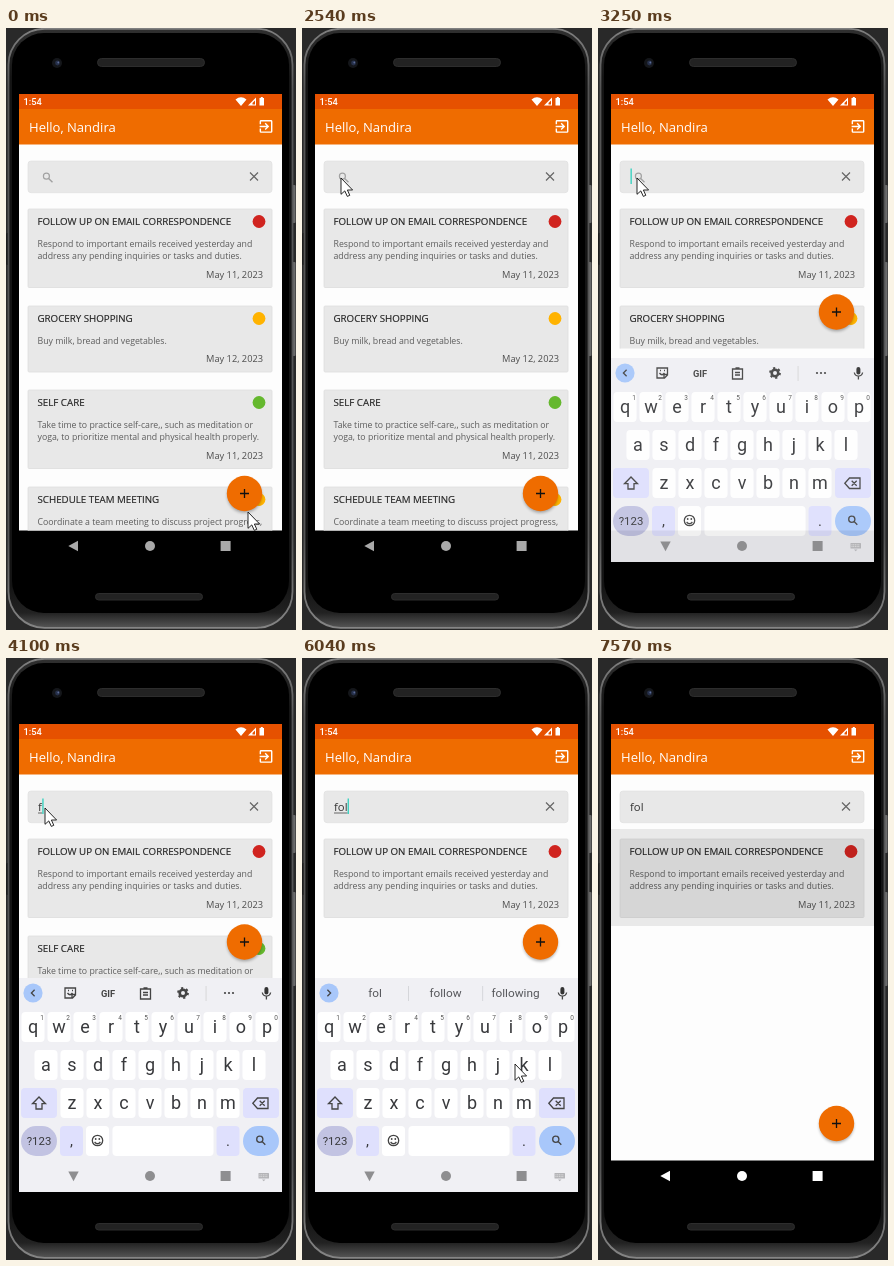
Write an HTML page that moves like this. It is 290 px wide and 602 px high and loops after 8290 ms.

```html
<!DOCTYPE html>
<html lang="en">
<head>
<meta charset="utf-8">
<title>Task search</title>
<style>
html, body { margin: 0; width: 100%; height: 100%; overflow: hidden; background: #292929; }
svg { display: block; width: 100vw; height: 100vh; }
text { font-family: "Open Sans", "Noto Sans", sans-serif; white-space: pre; }
.kb text, .status { font-family: Roboto, Arial, sans-serif; }
.mid { text-anchor: middle; }
.line { fill: none; stroke: #444; stroke-width: 1.3; }
</style>
</head>
<body>
<svg id="stage" viewBox="0 0 290 602" xmlns="http://www.w3.org/2000/svg"></svg>
<script>
const LOOP = 8290;
const stage = document.getElementById('stage');

const rect = (x, y, w, h, fill, r = 0, more = '') =>
  `<rect x="${x}" y="${y}" width="${w}" height="${h}" rx="${r}" fill="${fill}" ${more}/>`;
const dot = (x, y, r, fill, more = '') => `<circle cx="${x}" cy="${y}" r="${r}" fill="${fill}" ${more}/>`;
const label = (x, y, size, fill, str, more = '') =>
  `<text x="${x}" y="${y}" font-size="${size}" fill="${fill}" ${more}>${str}</text>`;
const path = (d, more = 'class="line"') => `<path d="${d}" ${more}/>`;
const group = (id, body, more = '') => `<g id="${id}" ${more}>${body}</g>`;
const shade = (id, ...stops) => `<linearGradient id="${id}" x2="0" y2="1">${stops.map(([at, color]) =>
  `<stop offset="${at}" stop-color="${color}"/>`).join('')}</linearGradient>`;

const tasks = [
  { title: 'FOLLOW UP ON EMAIL CORRESPONDENCE', color: '#d0241f', date: 'May 11, 2023',
    lines: ['Respond to important emails received yesterday and', 'address any pending inquiries or tasks and duties.'] },
  { title: 'GROCERY SHOPPING', color: '#ffb300', date: 'May 12, 2023',
    lines: ['Buy milk, bread and vegetables.'] },
  { title: 'SELF CARE', color: '#65b82e', date: 'May 11, 2023',
    lines: ['Take time to practice self-care,, such as meditation or', 'yoga, to prioritize mental and physical health properly.'] },
  { title: 'SCHEDULE TEAM MEETING', color: '#ffb300', date: 'May 12, 2023',
    lines: ['Coordinate a team meeting to discuss project progress,'] }
];

function card(task, i) {
  const h = 53.5 + 12.5 * task.lines.length;
  return group('card' + i,
    rect(22, 0, 244, h, '#e8e8e8', 1, 'stroke="#dedede" stroke-width=".8"') +
    label(31.5, 16, 9.74, '#222', task.title, 'stroke="#222" stroke-width=".15"') +
    task.lines.map((s, n) => label(31.5, 37.5 + 12.5 * n, 8.75, '#5c5c5c', s)).join('') +
    label(257, h - 9.8, 9.25, '#4c4c4c', task.date, 'text-anchor="end"') +
    dot(253, 12.5, 6.4, task.color));
}

function phone() {
  return rect(286, 157, 3.5, 38, '#6c6c6c', 1) + rect(286, 234, 3.5, 94, '#6c6c6c', 1) +
    rect(.5, 205, 3, 32, '#111', 1) +
    rect(2.5, .8, 284, 599, 'url(#body)', 36, 'stroke="url(#rim)" stroke-width="1.8"') +
    rect(6, 5, 277, 580, '#000', 32) +
    rect(91.5, 30.5, 107, 8, '#222', 4, 'stroke="#2d2d2d"') +
    rect(89.5, 565.5, 107, 6.5, '#222', 3.2, 'stroke="#2d2d2d"') +
    dot(51, 35, 5, '#14161a') + dot(51.5, 35, 2.4, '#26304a') + dot(52.3, 34.5, .9, '#5c6c98');
}

function bars() {
  return rect(13, 66, 263, 15.5, '#e65100') + rect(13, 81, 263, 35.5, '#ef6c00') +
    label(17.5, 77, 9.3, '#fff', '1:54', 'class="status" font-weight="500"') +
    path('M229.5 71.5Q235 67 240.5 71.5L235 78ZM242 77.5H250V69.5ZM253.5 70H254.8V69H256.8V70H258V77.5H253.5Z', 'fill="#fff"') +
    path('M246.5 76.5H249V72.5L246.5 75Z', 'fill="#e65100"') +
    label(23, 104, 13.05, '#fff', 'Hello, Nandira') +
    path('M10.1 15.6L11.5 17l5-5-5-5-1.4 1.4L12.7 11H3v2h9.7zM19 3H5a2 2 0 0 0-2 2v4h2V5h14v14H5v-4H3v4a2 2 0 0 0 2 2h14a2 2 0 0 0 2-2V5a2 2 0 0 0-2-2z',
      'fill="#fff" transform="translate(251.5 89.9) scale(.71)"');
}

function searchBox() {
  return rect(22, 133, 244, 31.7, '#e8e8e8', 3, 'stroke="#dedede" stroke-width=".6"') +
    group('hint', dot(40.4, 148.2, 3, 'none', 'stroke="#a2a2a2" stroke-width="1.2"') +
      path('M42.6 150.4L46.5 154.3', 'stroke="#a2a2a2" stroke-width="1.4"')) +
    path('M244 144.5L252 152.5M252 144.5L244 152.5', 'stroke="#666" stroke-width="1.2"') +
    label(32, 153, 11.3, '#333', '', 'id="query"') +
    rect(32, 154.6, 0, .8, '#444', 0, 'id="under"') +
    rect(0, 140.5, 1.3, 15.5, '#2fd0bd', 0, 'id="caret"');
}

function key(x, y, w, str, fill = '#fff', r = 4, size = 18) {
  return rect(x - w / 2, y, w, 30, fill, r) +
    label(x, y + 15 + size / 3, size, '#38393c', str, 'class="mid"');
}

function keyboard() {
  const lilac = '#dfe0fd', blue = '#a8c7fa';
  const row = (chars, x, y) => [...chars].map((c, i) => key(x + 26 * i, y, 23, c)).join('');
  const digits = [...'1234567890'].map((c, i) =>
    label(36 + 26 * i, 362, 6.5, '#555', c, 'class="mid"')).join('');
  const tools =
    path('M59 330H69.5V337L66.5 340H59ZM69.5 336.5H66V340M61.5 335Q64 338.5 66.5 335M62 332.5H63M66 332.5H67') +
    label(102, 338.6, 9.3, '#444', 'GIF', 'class="mid" font-weight="700"') +
    path('M134.5 331H144.5V341H134.5ZM137.5 330H141.5M137 334.5H142M137 337H142') +
    dot(177, 335, 3.3, 'none', 'stroke="#444" stroke-width="2.6"') +
    dot(177, 335, 5, 'none', 'stroke="#444" stroke-width="1.8" stroke-dasharray="2.2 3.04"') +
    rect(199.7, 328, .7, 15, '#ccc') +
    [219, 223, 227].map(x => dot(x, 335, 1.1, '#444')).join('');
  const words = [['fol', 73], ['follow', 143.5], ['following', 213.5]]
    .map(([s, x]) => label(x, 339.3, 11.8, '#55565a', s, 'class="mid"')).join('') +
    rect(106, 328, .8, 15, '#cfd0d4') + rect(180.3, 328, .8, 15, '#cfd0d4');

  return rect(13, 320, 263, 214, '#f0f0f4', 0, 'id="tray"') +
    dot(27, 335, 9.6, blue) + path('M28.6 331.8L25.4 335L28.6 338.2', 'class="line" id="chevron"') +
    group('tools', tools) + group('words', words) +
    rect(258.4, 329, 4, 7.5, '#333', 2) + path('M256.3 334.5A4.2 4.2 0 0 0 264.6 334.5M260.4 338.7V341.5') +
    row('qwertyuiop', 27, 354) + digits + row('asdfghjkl', 40, 392) + row('zxcvbnm', 66, 430) +
    key(33, 430, 36, '', lilac) + path('M33 439L26.5 445.7H30V451H36V445.7H39.5Z') +
    key(255, 430, 36, '', lilac) + path('M251.5 440H262V450.5H251.5L246.8 445.2ZM253.7 442.8L258.7 447.8M258.7 442.8L253.7 447.8') +
    key(33, 468, 36, '?123', '#c2c3e2', 15, 11.4) + key(65.5, 468, 23, ',', lilac, 4, 15) +
    key(91.5, 468, 23, '') + dot(91.5, 482.5, 5.2, 'none', 'class="line"') +
    dot(89.7, 481, .9, '#444') + dot(93.3, 481, .9, '#444') + path('M88.6 484Q91.5 487.5 94.4 484') +
    key(157, 468, 101, '') + key(222, 468, 23, '.', lilac, 4, 15) + key(255, 468, 36, '', blue, 15) +
    dot(253.8, 481.2, 3.1, 'none', 'class="line"') + path('M256.1 483.5L259.3 486.7');
}

function navIcons() {
  return path('M62.3 518L72 512.8V523.2Z', 'id="back"') + dot(144, 518, 5) + rect(214.6, 513, 10, 10, 'inherit') +
    group('imeIcon', rect(252.5, 515, 10.5, 5.4, '#b4b4b7', .5) +
      path('M253.5 516.8H262M253.5 518.6H262', 'stroke="#eee" stroke-width=".7" stroke-dasharray="1 .7"') +
      path('M256 521.5H259.5L257.7 523.2Z', 'fill="#b4b4b7"'));
}

stage.innerHTML = `<defs>
  <clipPath id="screen">${rect(13, 66, 263, 468, '#000')}</clipPath>
  <clipPath id="list"><rect id="listBox" x="13" y="116" width="263" height="386.5"/></clipPath>
  <filter id="soft" x="-30%" y="-30%" width="160%" height="160%"><feGaussianBlur stdDeviation="1.8"/></filter>
  ${shade('body', [0, '#303030'], [.08, '#141414'], [.93, '#141414'], [.975, '#222'], [1, '#565656'])}
  ${shade('rim', [0, '#808080'], [.1, '#555'], [.85, '#555'], [1, '#858585'])}
  </defs>` +
  phone() + rect(13, 116, 263, 386.5, '#fdfdfd') +
  `<g clip-path="url(#list)">${tasks.map(card).join('')}${rect(13, 171, 263, 97, '#000', 0, 'id="focus"')}${searchBox()}</g>` +
  bars() +
  group('fab', dot(0, 2, 17.3, '#000', 'opacity=".3" filter="url(#soft)"') + dot(0, 0, 17.7, '#ef6c00') +
    path('M-4.5 0H4.5M0 -4.5V4.5', 'stroke="#111" stroke-width="1.3"')) +
  `<g clip-path="url(#screen)">${group('kb', keyboard(), 'class="kb"')}</g>` +
  rect(34, 503, 68, 31, '#000', 15, 'id="ripple"') + group('nav', navIcons()) +
  path('M0 0V16.3L3.8 12.9L6.3 18.4L8.8 17.3L6.4 12H11.6Z', 'id="mouse" fill="#fff" stroke="#111" stroke-width=".9"');

const $ = Object.fromEntries([...stage.querySelectorAll('[id]')].map(e => [e.id, e]));
const set = (el, attrs) => { for (const k in attrs) el.setAttribute(k, attrs[k]); };
const show = (el, on) => set(el, { opacity: +on });

// Every track holds its value until the next entry: [time, ...values]
const mouse = [[0, 242, 484], [1060, 196, 452], [1210, 136, 407], [1480, 115, 357], [1600, 99, 317],
  [1720, 78, 259], [1850, 61, 211], [1990, 47, 172], [2120, 39, 154], [2260, 37, 150], [2540, 39, 150],
  [5490, 130, 230], [5630, 215, 318], [5760, 237, 351], [6040, 213, 406], [6170, 165, 455],
  [6300, 105, 502], [6420, 75, 520], [7270, 78, 542], [7420, 82, 582], [7570, 82, 640]];
const panel = [[0, 214, 0], [2850, 150, .08], [2970, 118, .35], [3100, 48, .72], [3250, 10, .94],
  [3400, 0, 1], [7270, 70, .6], [7420, 140, .15], [7570, 214, 0]];
const caretOn = [[0, 0], [2850, 1], [3400, 0], [3830, 1], [5220, 0], [5760, 1], [6170, 0], [6700, 1], [6830, 0]];
const typed = [[0, ''], [4100, 'f'], [4380, 'fo'], [4670, 'fol']];
const caretX = [32.5, 36.3, 43, 45.6];
const focus = [[0, 0], [6700, .04], [6830, .08]];
const ripple = [[0, 0], [6830, .04], [6970, .06], [7270, .03], [7420, 0]];

const at = (track, t) => track.findLast(k => k[0] <= t).slice(1);

function listAt(t) {
  if (t < 4100) return [[181, 1], [278, 1], [362, 1], [459, 1]];
  return [[181, 1], [0, 0], [278, t < 4380 ? 1 : t < 4530 ? .4 : 0], [0, 0]];
}

function draw(t) {
  const [mx, my] = at(mouse, t), [drop, alpha] = at(panel, t), [query] = at(typed, t);
  const open = t >= 2970 && t < 7420, suggest = t >= 4530;

  set($.mouse, { transform: `translate(${mx} ${my})` });
  set($.kb, { transform: `translate(0 ${drop})`, opacity: alpha });
  set($.listBox, { height: open ? 204.5 : 386.5 });
  set($.fab, { transform: `translate(238.5 ${open ? 284 : 465.5})` });
  listAt(t).forEach(([y, o], i) => set($['card' + i], { transform: `translate(0 ${y})`, opacity: o }));

  show($.hint, !query);
  $.query.textContent = query;
  set($.under, { width: t < 6830 && query ? caretX[query.length] - 32 : 0 });
  set($.caret, { x: caretX[query.length], opacity: at(caretOn, t)[0] });
  set($.focus, { opacity: at(focus, t)[0] });

  show($.tools, !suggest);
  show($.words, suggest);
  set($.chevron, { transform: suggest ? 'rotate(180 27 335)' : '' });

  const full = t >= 3250 && t < 7270;
  const tint = t >= 7270 ? '#fff' : t >= 6830 ? '#606063' : full ? '#8e8e90' : '#a9a9a9';
  set($.tray, { fill: full ? '#f0f0f4' : '#fff' });
  set($.nav, { fill: tint });
  set($.back, { transform: full ? 'rotate(-90 67.5 518)' : '' });
  show($.imeIcon, t >= 2970 && t < 7270);
  set($.ripple, { opacity: at(ripple, t)[0] });
}

const start = performance.now();
function tick() {
  draw((performance.now() - start) % LOOP);
  requestAnimationFrame(tick);
}
tick();
</script>
</body>
</html>
```
